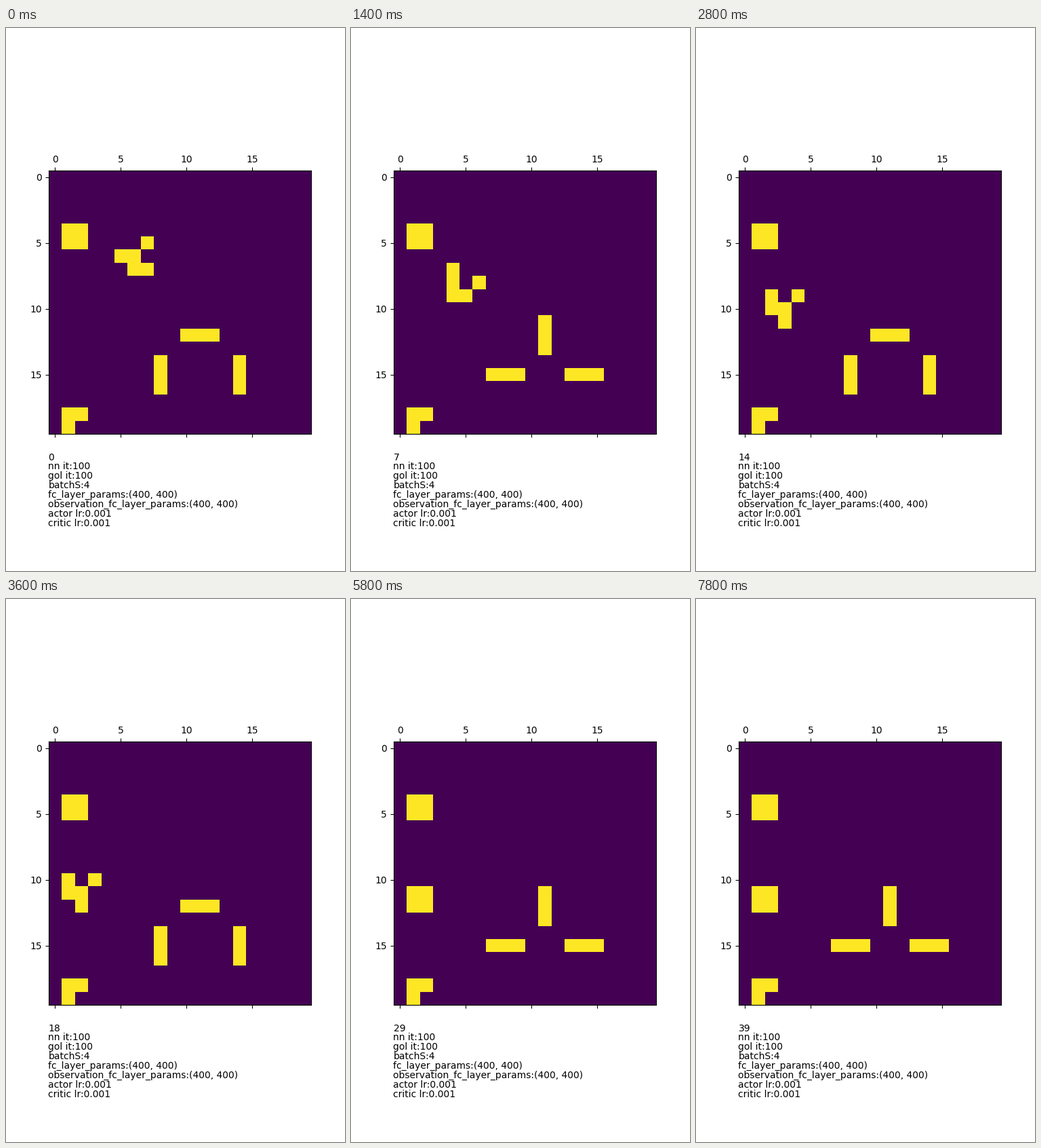
A matplotlib script that plays this animation: 500 by 800 pixels, repeating every 8 s.

```python
import numpy as np
import matplotlib.pyplot as plt
from matplotlib.animation import FuncAnimation

W, H, DPI = 500, 800, 100
SIZE, STEPS, STEP_MS = 20, 40, 200
LINE = 14

BLOCK = "OO/OO"
CORNER = "OO/O."
GLIDER = "..O/OO./.OO"
BAR = "OOO"
POST = "O/O/O"

INFO = [
    "nn it:100",
    "gol it:100",
    "batchS:4",
    "fc_layer_params:(400, 400)",
    "observation_fc_layer_params:(400, 400)",
    "actor lr:0.001",
    "critic lr:0.001",
]


def stamp(board, shape, row, col):
    for r, line in enumerate(shape.split("/")):
        for c, mark in enumerate(line):
            board[row + r, col + c] = mark == "O"


def first_board():
    board = np.zeros((SIZE, SIZE), int)
    stamp(board, BLOCK, 4, 1)
    stamp(board, GLIDER, 5, 5)
    stamp(board, CORNER, 18, 1)
    mid = 11
    stamp(board, BAR, 12, mid - 1)
    for side in (-3, 3):
        stamp(board, POST, 14, mid + side)
    return board


def evolve(board):
    """One Game of Life step; the outermost ring of cells never changes."""
    n = SIZE - 2
    near = sum(board[r:r + n, c:c + n]
               for r in range(3) for c in range(3) if (r, c) != (1, 1))
    new = board.copy()
    inner = board[1:-1, 1:-1]
    new[1:-1, 1:-1] = (near == 3) | ((inner == 1) & (near == 2))
    return new


boards = [first_board()]
while len(boards) < STEPS:
    boards.append(evolve(boards[-1]))

plt.rcParams["font.family"] = "DejaVu Sans"
fig, ax = plt.subplots(figsize=(W / DPI, H / DPI), dpi=DPI)
grid = ax.matshow(boards[0], cmap="viridis", vmin=0, vmax=1)


def put_line(y, text):
    """Text with its baseline y pixels below the top edge."""
    return fig.text(0.125, 1 - y / H, text, fontsize=10, va="baseline")


counter = put_line(637, "0")
for row, text in enumerate(INFO):
    put_line(650 + LINE * row, text)


def draw(i):
    grid.set_data(boards[i])
    counter.set_text(str(i))
    return grid, counter


anim = FuncAnimation(fig, draw, frames=STEPS, interval=STEP_MS,
                     repeat=True, repeat_delay=0)
plt.show()
```
